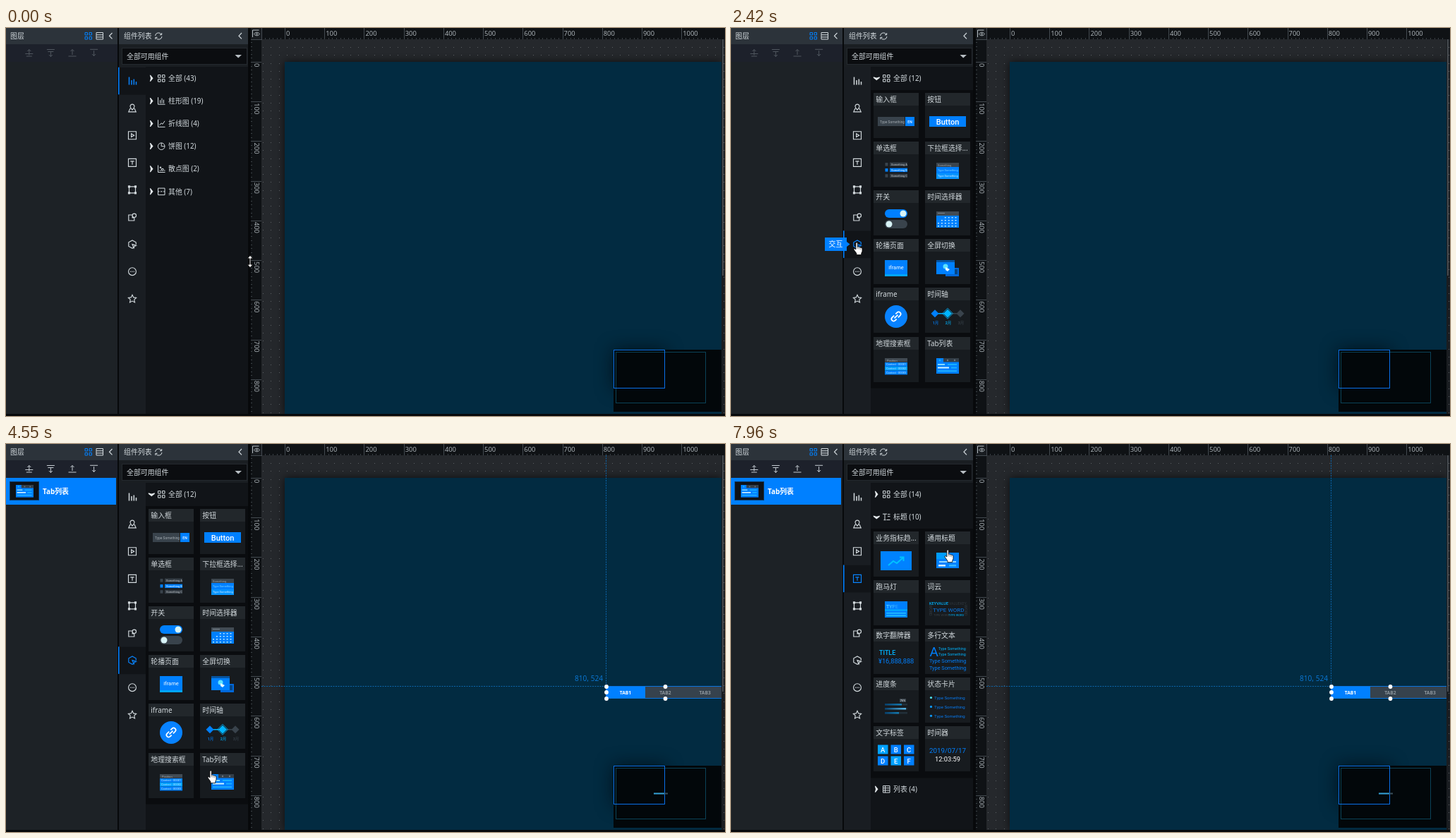
Animation, 1019 px wide and 550 px high, one loop 8000 ms. Source, as an HTML page with a canvas:

```html
<!DOCTYPE html>
<html lang="zh-CN">
<head>
<meta charset="utf-8">
<title>组件列表</title>
<style>
html, body { margin: 0; width: 100%; height: 100%; overflow: hidden; background: #0d0f12; }
canvas { display: block; width: 1019px; height: 550px; font-family: "Noto Sans", "Noto Sans CJK SC", sans-serif; }
</style>
</head>
<body>
<canvas id="stage" width="1019" height="550"></canvas>
<script>
const g = document.getElementById('stage').getContext('2d');
const LOOP = 8000;
const SANS = '"Noto Sans","Noto Sans CJK SC","Noto Sans CJK",sans-serif';
const ROBOTO = 'Roboto,"Noto Sans CJK SC",sans-serif';
const BLUE = '#0080ff', CYAN = '#00b4ff', INK = '#d3dade', GREY = '#39434c', EDGE = '#07090b';

// ---------- helpers ----------
function box(x, y, w, h, c) { g.fillStyle = c; g.fillRect(x, y, w, h); }
function frame(x, y, w, h, c) { g.strokeStyle = c; g.lineWidth = 1; g.strokeRect(x + .5, y + .5, w - 1, h - 1); }
function text(s, x, y, size = 9.9, c = INK, { align = 'left', font = SANS, weight = 400 } = {}) {
  g.font = `${weight} ${size}px ${font}`;
  g.textAlign = align;
  g.fillStyle = c;
  g.fillText(s, x, y);
}
const label = (s, x, y, size, c, weight = 400, align = 'left') => text(s, x, y, size, c, { align, weight, font: ROBOTO });
function disc(x, y, r, c) { g.fillStyle = c; g.beginPath(); g.arc(x, y, r, 0, 7); g.fill(); }
function pill(x, y, w, h, c) { g.fillStyle = c; g.beginPath(); g.roundRect(x, y, w, h, h / 2); g.fill(); }
function poly(pts, c) {
  g.fillStyle = c;
  g.beginPath();
  for (let i = 0; i < pts.length; i += 2) g.lineTo(pts[i], pts[i + 1]);
  g.fill();
}
function line(d, x, y, c, w = 1, fill) {
  g.save();
  g.translate(x, y);
  const p = new Path2D(d);
  if (fill) { g.fillStyle = fill; g.fill(p); }
  g.strokeStyle = c; g.lineWidth = w; g.stroke(p);
  g.restore();
}
const hgrad = (x0, x1, a, b) => {
  const q = g.createLinearGradient(x0, 0, x1, 0);
  q.addColorStop(0, a); q.addColorStop(1, b);
  return q;
};

// ---------- icons ----------
const CATS = [
  'M1.5 .5v11M5 5v6.5M8.3 3.5v8M11.5 7v4.5',
  'M6 .5a3 3 0 0 1 3 3c0 2.2-3 5-3 5s-3-2.8-3-5a3 3 0 0 1 3-3M3 6.5L.8 11.2h10.4L9 6.5',
  'M.5 .5h11v11h-11zM4.6 3.6v4.8L8.6 6z',
  'M.5 .5h11v11h-11zM3.3 4h5.4M6 4v5',
  'M1.5 1.5h9v9h-9zM.5 .5h2v2h-2zM9.5 .5h2v2h-2zM.5 9.5h2v2h-2zM9.5 9.5h2v2h-2z',
  'M6 3H.8v8h8V7M11.5 3.8a2.7 2.7 0 1 1-5.4 0a2.7 2.7 0 1 1 5.4 0M6.1 3.8v3h2.5',
  'M9 10.1L6 11.7 .8 8.8V3.2L6 .3l5.2 2.9V6.5M6 6l5.4 1.8-2.4 1-.9 2.4z',
  'M11.4 6a5.4 5.4 0 1 1-10.8 0a5.4 5.4 0 1 1 10.8 0M3 6h1.4M5.3 6h1.4M7.6 6H9',
  'M6 .5l1.7 3.6 3.9.5-2.9 2.7.8 3.9L6 9.3l-3.5 1.9.8-3.9L.4 4.6l3.9-.5z'
];
const ICON = {
  grid: 'M.5 .5h3.5v3.5h-3.5zM6.5 .5h3.5v3.5h-3.5zM.5 6.5h3.5v3.5h-3.5zM6.5 6.5h3.5v3.5h-3.5z',
  bars: 'M.5 0v10H10.5M3.5 4v4.5M6 1.5v7M8.5 3.5v5',
  lines: 'M.5 0v10H10.5M2.5 7.5l2.5-3 2 1.5 3-4.5',
  pie: 'M10 5.3a4.8 4.8 0 1 1-4.8-4.8a4.8 4.8 0 0 1 4.8 4.8M5.2 .5v4.8H10',
  dots: 'M.5 0v10H10.5M3.2 2.5h1.5v1.5h-1.5zM5.5 5h2.5v2.5h-2.5zM2.5 7.5h2M9 7.5h1.5',
  other: 'M.5 .5h9.5v9.5h-9.5zM.5 5.2h2M4 5.2h2.6M8 5.2h2',
  title: 'M0 1h6M3 1v8.5M1.5 9.5h3M7 1.5h3.5M7 4.5h3.5M5.5 9.3h5',
  list: 'M.5 .5h9.5v9.5h-9.5zM.5 3.6H10M.5 6.8H10M3.5 .5v9.5'
};
const ORDER = [
  'M0 7h11M1.5 10.5h8M5.5 9V1M3 3.5L5.5 1 8 3.5',
  'M0 1h11M1.5 4h8M5.5 4v7M3 8.5L5.5 11 8 8.5',
  'M0 10.5h11M5.5 8.5V1M3 3.5L5.5 1 8 3.5',
  'M0 .8h11M5.5 2.5V10M3 7.5L5.5 10 8 7.5'
];

// ---------- thumbnails, drawn relative to a card corner ----------
const THUMBS = {
  '输入框'() {
    box(6, 34, 38, 13, GREY); label('Type Something', 9, 42.5, 4.9, '#a3abb1');
    box(45, 34, 13, 13, BLUE); label('EN', 51.5, 42.5, 5, '#fff', 500, 'center');
  },
  '按钮'() { box(6, 33, 52, 15, BLUE); label('Button', 32, 44.5, 11, '#fff', 500, 'center'); },
  '单选框'() {
    for (let i = 0; i < 3; i++) {
      const y = 30 + i * 8.1, on = i == 1;
      box(16.5, y, 4, 4.5, on ? BLUE : GREY);
      box(23, y - .5, 25, 5.5, on ? BLUE : '#343c44');
      label('Something ' + 'ABC'[i], 25, y + 4, 4, on ? '#fff' : '#c0c6ca');
    }
  },
  '下拉框选择...'() {
    box(16, 30, 32, 6, '#3c454d'); label('Something', 18, 34.7, 4, '#9ba3a9');
    box(16, 36, 32, 9, BLUE); box(16, 45, 32, 8, '#0894ff');
    label('Type Something', 18, 42, 4, '#7fd2ff'); label('Type Something', 18, 50, 4, '#d5efff');
  },
  '开关'() {
    pill(16, 27, 32, 12, BLUE); disc(42, 33, 4.5, '#d8f4f7');
    pill(16, 42, 32, 12, GREY); disc(22, 48, 4.5, '#d8f4f7');
  },
  '时间选择器'() {
    box(16, 30, 32, 6, '#424b53'); box(16, 36, 32, 17, BLUE); box(18, 32, 10, 1, '#7d868d');
    for (let r = 0; r < 4; r++) for (let c = 0; c < 6; c++) if (r + c > 1) box(18 + c * 4.9, 38 + r * 4, 2, 1.5, '#b9e6ff');
  },
  '轮播页面'() {
    box(16, 30, 32, 23, BLUE); box(16, 50, 32, 3, '#00a6ff'); label('iframe', 32, 43, 7.5, '#fff', 400, 'center');
  },
  '全屏切换'() {
    box(29, 41, 19, 12, '#0067d9'); box(31, 43, 15, 7, '#074584');
    box(16, 30, 26, 20, BLUE); box(16, 30, 26, 3, '#08549f');
    disc(29, 39, 3.5, '#5ce2ff'); poly([29, 40, 35, 43, 32, 46, 29, 44], '#e6fbff');
  },
  'iframe'() {
    disc(32, 41, 16, '#0882ff');
    g.save(); g.translate(32, 41); g.rotate(-Math.PI / 4);
    line('M-1 -3h-4a3 3 0 0 0 0 6h3M1 3h4a3 3 0 0 0 0 -6h-3M-3.5 0h7', 0, 0, '#fff', 1.7);
    g.restore();
  },
  '时间轴'() {
    box(14, 36, 18, 1.5, CYAN); box(32, 36, 18, 1.5, GREY);
    [[14, 5.5, BLUE], [32, 6, CYAN], [50, 5.5, GREY]].forEach(([x, r, c], i) => {
      poly([x - r, 36.7, x, 36.7 - r, x + r, 36.7, x, 36.7 + r], c);
      label(i + 1 + '月', x + 1, 51.5, 5.5, c, 500, 'center');
    });
    line('M24.5 36.7L32 29.2L39.5 36.7L32 44.2z', 0, 0, CYAN, .8);
  },
  '地理搜索框'() {
    box(16, 30, 32, 5.5, '#424b53'); label('Position', 19, 34.5, 4, '#a9b0b5');
    for (let i = 0; i < 3; i++) {
      box(16, 36 + i * 5.8, 32, 5.8, i == 1 ? '#00a0ff' : BLUE);
      label('Contect - 0000' + (i + 1), 18, 40.4 + i * 5.8, 4, '#c9ecff');
    }
  },
  'Tab列表': tabThumb,
  '业务指标趋...'() {
    box(10, 28, 44, 27, '#0082ff');
    line('M21 48l7-6 5 3 9-8M37 36.5h5.5v5.5', 0, 0, '#00c3ff', 2);
  },
  '通用标题'() {
    box(16, 30, 32, 22, BLUE); box(16, 30, 16, 9, '#009dff'); box(20, 42, 24, 2, '#8fd4ff');
    box(19, 47, 10, 2.5, '#d8f0ff'); box(34, 47, 10, 2.5, '#35b5ff');
  },
  '跑马灯'() {
    box(16, 30, 32, 23, BLUE); label('TYPE', 18, 39.5, 7, hgrad(18, 38, '#6ae3ff', '#0b84ff'), 500);
    box(16, 41.5, 32, 2, '#00afff'); box(18, 46, 28, 1.5, '#25c4ff'); box(18, 49.5, 28, 1.5, '#25c4ff');
  },
  '词云'() {
    label('KEYVALUE', 6, 34.5, 5.6, CYAN, 500); label('VALUEKEY', 34, 34.5, 5.2, '#30383f');
    label('TYPE WORD', 11, 44.5, 8.1, '#0878e8', 400);
    label('TYPE WORD', 12, 51, 4, '#3a434a'); label('TYPE WORD', 33, 51, 4, '#009bd8', 500);
    for (const x of [6, 56]) { g.save(); g.translate(x, 35); g.rotate(Math.PI / 2); label('WORD', 0, 0, 5.5, '#343c43'); g.restore(); }
  },
  '数字翻牌器'() { label('TITLE', 8, 36.5, 9, CYAN, 500); label('¥16,888,888', 7, 48.5, 9.3, BLUE); },
  '多行文本'() {
    label('A', 6.5, 38.5, 19, BLUE);
    label('Type Something', 19, 29.5, 5.4, CYAN); label('Type Something', 19, 38, 5.4, CYAN);
    label('Type Something', 6, 48, 7.3, BLUE); label('Type Something', 6, 58, 7.3, BLUE);
  },
  '进度条'() {
    [24, 30, 20].forEach((w, i) => {
      box(16, 37 + i * 6, 32, 2.5, '#22303a');
      box(16, 37 + i * 6, w, 2.5, hgrad(16, 16 + w, '#07406c', i == 1 ? '#5bb9e8' : '#147db5'));
    });
    box(37, 30, 9, 5, '#3c454d'); label('76%', 41.5, 34.2, 4, '#dfe5e8', 400, 'center');
  },
  '状态卡片'() {
    for (let i = 0; i < 3; i++) {
      disc(8.5, 28.5 + i * 12.9, 1.6, i ? '#0d9dff' : '#4fe6f0');
      label('Type Something', 13, 30.8 + i * 12.9, 6.1, '#0878ec');
    }
  },
  '文字标签'() {
    [...'ABCDEF'].forEach((s, i) => {
      const x = 6 + i % 3 * 18.5, y = i < 3 ? 26.5 : 42.5;
      box(x, y, 14.5, 13, i == 0 || i == 4 ? '#00a2ff' : BLUE);
      label(s, x + 7.2, y + 10, 9.5, '#fff', 500, 'center');
    });
  },
  '时间器'() { label('2019/07/17', 32, 38, 9.8, BLUE, 400, 'center'); label('12:03:59', 32, 50, 9.3, '#fff', 400, 'center'); }
};
function tabThumb() {
  box(16, 30, 32, 22, BLUE); box(26, 30, 22, 5.5, '#343e47');
  disc(21, 33, 1.3, '#0fb9ff'); disc(32, 33, 1.2, '#6d7780'); disc(42, 33, 1.2, '#6d7780');
  box(18, 38, 10, 2, '#84d8ff'); box(32, 38, 13, 2, '#18afff');
  box(18, 42.5, 16, 2, '#d2f1ff'); box(37, 42.5, 8, 2, '#18afff'); box(18, 47.5, 27, 1.5, '#26b9ff');
}
const INTERACT = ['输入框', '按钮', '单选框', '下拉框选择...', '开关', '时间选择器', '轮播页面', '全屏切换', 'iframe', '时间轴', '地理搜索框', 'Tab列表'];
const TITLES = ['业务指标趋...', '通用标题', '跑马灯', '词云', '数字翻牌器', '多行文本', '进度条', '状态卡片', '文字标签', '时间器'];

// ---------- left panels ----------
function layers(added) {
  box(0, 0, 158, 550, '#1d2226');
  box(0, 0, 158, 23, '#2c333a');
  box(0, 23, 158, 25, '#1d212b');
  text('图层', 6, 15.3);
  line(ICON.grid, 111.5, 6, BLUE);
  line('M.5 .5h9.5v9.5h-9.5zM.5 3.7H10M.5 6.9H10', 127.5, 6, INK);
  line('M4 0L0 4.2L4 8.4', 146.5, 7, INK, 1.2);
  ORDER.forEach((d, i) => line(d, 27.3 + i * 30.6, 29.5, added ? '#c5ccd2' : '#50575f'));
  if (added) {
    box(0, 48, 156, 38, BLUE);
    box(5, 53, 42, 27, '#0e1216'); frame(5, 53, 42, 27, '#10385e');
    g.save(); g.translate(1.5, 34); g.scale(.78, .8); tabThumb(); g.restore();
    text('Tab列表', 52, 71, 9.9, '#fff', { weight: 700 });
  }
  box(158, 0, 2, 550, EDGE);
}
function row(y, icon, s, open) {
  if (open) poly([201.8, y - 2, 206.3, y - .7, 210.8, y - 2, 210.8, y - .5, 206.3, y + 3, 201.8, y - .5], '#e3e8eb');
  else poly([203.8, y - 4.5, 205, y - 4.5, 208.6, y, 205, y + 4.5, 203.8, y + 4.5, 205, y], '#e3e8eb');
  line(ICON[icon], 215, y - 5.2, INK);
  text(s, 230, y + 3.7);
}
function cards(names, top, thumbs) {
  const rows = names.length / 2;
  box(198, top - 4, 145, rows * 69.1 + 8, '#0a0c0f');
  names.forEach((s, i) => {
    g.save();
    g.translate(i % 2 ? 275 : 202, Math.round(top + (i >> 1) * 69.1));
    box(0, 0, 64, 64, '#171b1f');
    box(0, 0, 64, 18, '#22272b');
    text(s, 3.3, 12.8);
    if (thumbs) THUMBS[s]();
    g.restore();
  });
}
function components(t) {
  const sel = t < 2300 ? 0 : t < 6210 ? 6 : 3;
  box(160, 0, 186, 550, '#111418');
  box(160, 0, 183, 23, '#2c333a');
  box(160, 23, 183, 32, '#1a1e22');
  text('组件列表', 167, 15.3);
  line('M.5 5a4.6 4.6 0 0 1 8.6-1.8M9.7 1v2.7H7M10 6a4.6 4.6 0 0 1-8.6 1.8M.8 10V7.3h2.7', 211, 6, INK);
  line('M4 0L0 4.2L4 8.4', 330, 7, INK, 1.2);
  box(164, 28, 178, 24, '#0b0d10'); frame(164, 28, 178, 24, '#24292e');
  text('全部可用组件', 171, 43.7);
  poly([324.5, 38, 334, 38, 329.2, 42.5], '#b7bec3');
  box(160, 55, 38, 495, '#191d22');
  CATS.forEach((d, i) => {
    const y = 75 + i * 38.6;
    if (i == sel) { box(160, y - 19, 38, 38.6, '#111418'); box(159, y - 19.3, 1.6, 38.6, BLUE); }
    line(d, 173, y - 6, i == sel ? '#0a84ff' : INK, i ? 1.15 : 1.5);
  });
  if (sel == 0) {
    [['grid', '全部 (43)'], ['bars', '柱形图 (19)'], ['lines', '折线图 (4)'], ['pie', '饼图 (12)'], ['dots', '散点图 (2)'], ['other', '其他 (7)']]
      .forEach(([k, s], i) => row(71.3 + i * 32.1, k, s));
  } else if (sel == 6) {
    row(71.3, 'grid', '全部 (12)', true);
    cards(INTERACT, 92, true);
  } else {
    const open = t >= 7450;
    row(71.3, 'grid', '全部 (14)');
    row(103.4, 'title', '标题 (10)', open);
    if (open) cards(TITLES, 124, t >= 7570);
    row(open ? 489.3 : 135.5, 'list', '列表 (4)');
  }
  box(343, 0, 4, 550, EDGE);
}

// ---------- stage ----------
function ruler() {
  const step = 56.22;
  box(347, 0, 672, 16, '#0f1215');
  box(347, 0, 15, 550, '#0f1215');
  for (let k = -5; k < 110; k++) {
    const p = k * step / 10, big = k % 10 == 0, c = big ? '#434a50' : '#3a4045';
    const x = Math.round(395 + p), y = Math.round(48 + p);
    if (x > 362) box(x, big ? 0 : 14, 1, big ? 16 : 2, c);
    if (y > 16 && y < 547) box(347, y, big ? 15 : 2, 1, c);
    if (!big || k < 0) continue;
    text(k * 10, 397 + p, 10.8, 9.4, '#a7aeb3');
    if (k > 80) continue;
    g.save(); g.translate(351.5, 50 + p); g.rotate(Math.PI / 2);
    text(k * 10, 0, 0, 9.4, '#a7aeb3');
    g.restore();
  }
  box(347, 0, 15, 16, '#181c20');
  box(362, 0, 1, 16, '#434a50'); box(347, 16, 16, 1, '#434a50');
  line('M0 11V1h9M2 6.5c2-3 6-3 8 0c-2 3-6 3-8 0M7 6.5a1 1 0 1 1-2 0a1 1 0 1 1 2 0', 349.5, 2, '#b9c1c6', 1);
}
function minimap(added) {
  g.save();
  g.shadowColor = 'rgba(0,8,14,.75)'; g.shadowBlur = 24;
  box(861, 456, 73, 55, '#02080c');
  g.restore();
  box(861, 456, 153, 88, '#02070a');
  frame(864, 459, 128, 73, '#0a4257');
  frame(861, 456, 73, 55, '#0a70e8');
  if (added) { box(918, 494.5, 15, 2, '#35a3d8'); box(933, 494.5, 5, 2, '#38505d'); }
}
function stage(t) {
  const added = t >= 4400;
  box(362, 16, 657, 534, '#25282c');
  g.save();
  g.shadowColor = 'rgba(0,0,0,.7)'; g.shadowBlur = 12;
  box(395, 48, 619, 499, '#022b41');
  g.restore();
  box(1014, 16, 5, 531, '#1a1d21');
  for (let y = 27; y < 547; y += 11.25) for (let x = 364; x < 1019; x += 11.25)
    if (x < 394 || x > 1013 || y < 47) box(Math.round(x), Math.round(y), 1, 1, '#5c6064');
  box(1015, 16, 2, 335, '#464b50');
  if (added) {
    g.save();
    g.strokeStyle = '#0c66ad'; g.lineWidth = 1; g.setLineDash([2, 1.5]);
    g.beginPath(); g.moveTo(850.5, 16); g.lineTo(850.5, 343);
    g.moveTo(362, 343.5); g.lineTo(850, 343.5); g.stroke();
    g.restore();
    text('810, 524', 806, 336, 10.1, '#0a74cf');
    if (t >= 4550) {
      box(850, 343, 164, 18, '#36424d');
      box(850, 343, 56, 18, BLUE);
      for (let i = 0; i < 3; i++)
        text('TAB' + (i + 1), 878 + i * 56.3, 355, 6.7, i ? '#8d969d' : '#fff', { align: 'center', weight: 700 });
    }
    box(850, 343, 164, 1, '#0a74df'); box(850, 360, 164, 1, '#0a74df'); box(850, 343, 1, 18, '#0a74df');
    for (const [x, y] of [[851, 344], [851, 352], [851, 361], [934.5, 344], [934.5, 361]]) disc(x, y, 2.9, '#fff');
  }
  minimap(added);
  ruler();
}

// ---------- pointer: time, left, top ----------
const PATH = [
  [0, 341, 322], [150, 242, 323], [430, 252, 317], [560, 238, 310], [710, 230, 306], [830, 220, 303], [950, 212, 301],
  [1090, 204, 291], [1210, 189, 279], [1330, 176, 270], [1450, 173, 288], [1600, 173, 296], [1720, 173, 303],
  [3420, 210, 350], [3550, 271, 423], [3700, 283, 461], [3850, 285, 462],
  [5390, 206, 304], [5540, 165, 239], [5700, 161, 219], [5840, 166, 205], [5960, 171, 191],
  [6630, 185, 178], [6750, 209, 151], [6880, 229, 129], [7030, 235, 115], [7150, 240, 106],
  [7690, 252, 112], [7810, 266, 119], [7960, 302, 149]
];
const HAND = 'M4 .9c1.1-.6 2 0 2 1.1v5c1-.5 1.9-.2 2.2.5c.9-.4 1.8 0 2.1.7c1.2-.4 2.4.2 2.4 1.6v3.5l-1.3 3v2H4.6v-2L1 11.2c-.9-1.3.3-2.5 1.6-1.5l1 1V2z';
function pointer(t) {
  const [at, x, y] = PATH.filter(p => p[0] <= t).pop();
  if (at == 0) line('M5 .5L9 4.8H5.9v8.4H9L5 17.5L1 13.2h3.1V4.8H1z', x, y, '#000', .8, '#fff');
  else if (at < 1330) line('M.5 .5v12.6l3-2.7 1.8 4.2 1.8-.8-1.8-4.1h3.9z', x, y, '#000', .9, '#fff');
  else {
    line(HAND, x + .3, y + .3, '#000', .8, '#fff');
    line('M6 7v3M8.2 8v2.3M10.4 9v2', x + .3, y + .3, '#333', .6);
  }
}
function tip(s, y, t, from, to) {
  if (t < from || t >= to) return;
  g.globalAlpha = t < from + 140 ? .6 : 1;
  box(133, y - 10, 31, 19, BLUE);
  poly([164, y - 4, 168.5, y - .5, 164, y + 3], BLUE);
  text(s, 138.5, y + 3.2, 9.9, '#fff');
  g.globalAlpha = 1;
}

function draw(t) {
  g.clearRect(0, 0, 1019, 550);
  stage(t);
  layers(t >= 4400);
  components(t);
  box(0, 547, 1019, 3, EDGE);
  tip('交互', 307, t, 2000, 3420);
  tip('文字', 191, t, 6210, 6630);
  pointer(t);
}
const start = performance.now();
(function tick() {
  draw((performance.now() - start) % LOOP);
  requestAnimationFrame(tick);
})();
</script>
</body>
</html>
```
